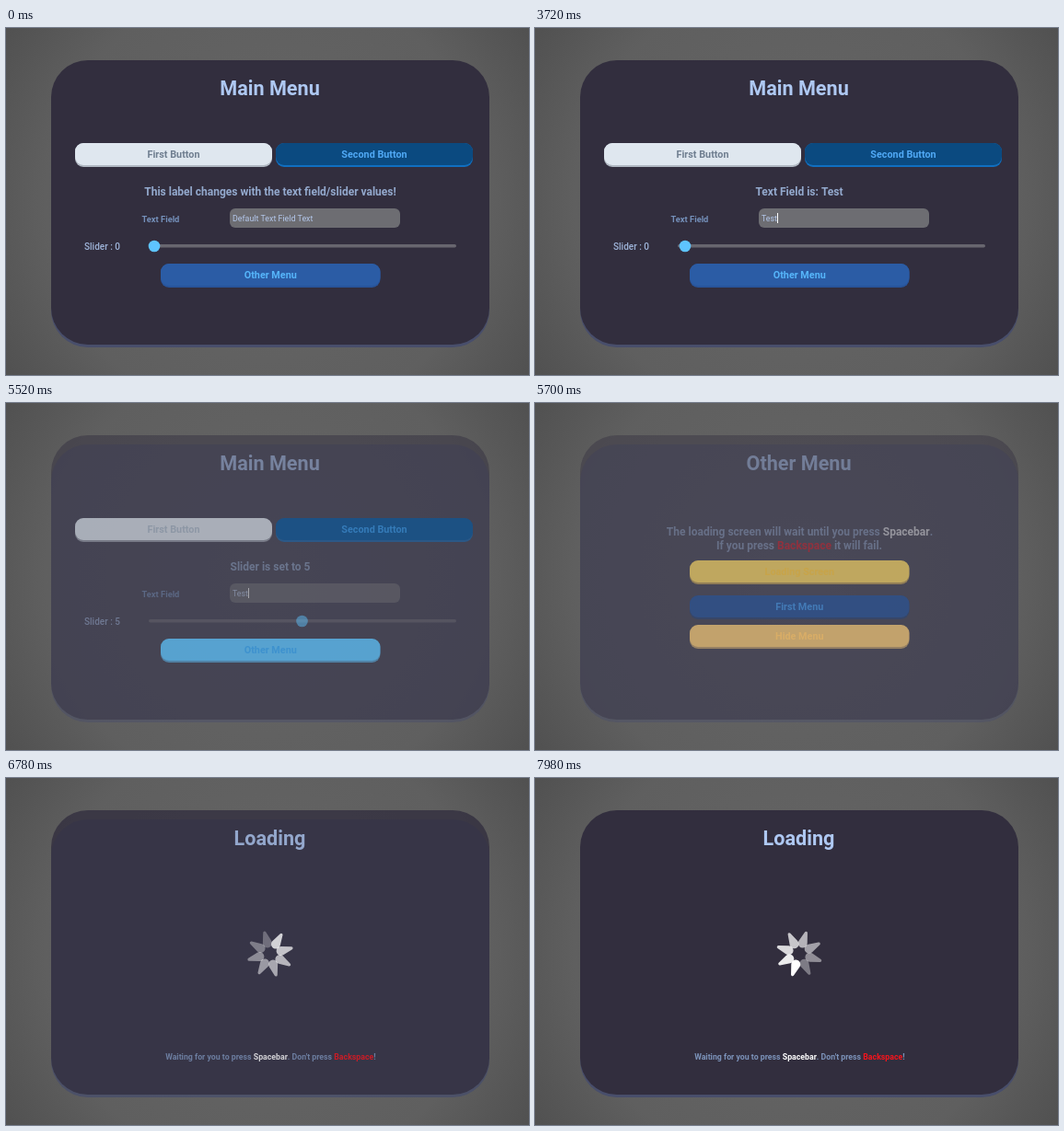
Recreate the animation shown at these times as an HTML page with a canvas. Size 568 px wide and 377 px high, loop 8 s.

```html
<!DOCTYPE html>
<html>
<head>
<meta charset="utf-8">
<style>
html, body { margin: 0; width: 100%; height: 100%; overflow: hidden; background: #5a5a5a; }
canvas { display: block; }
</style>
</head>
<body>
<canvas id="stage" width="568" height="377"></canvas>
<script>
const ctx = document.getElementById('stage').getContext('2d');
const LOOP = 8000, STEP = 60, CX = 287;
const TITLE = '#aec8f2', LABEL = '#93a9cd', NOTE = '#7c93ba';

const backdrop = ctx.createRadialGradient(284, 188, 0, 284, 188, 345);
backdrop.addColorStop(0, '#666');
backdrop.addColorStop(0.7, '#5f5f5f');
backdrop.addColorStop(1, '#505050');

const clamp = v => Math.max(0, Math.min(1, v));
const settle = (t, start, rate) => t < start ? 0 : 1 - Math.exp((start - t) / rate);
// Value of the last [time, value] pair that has been reached.
const latest = (pairs, t) => pairs.reduce((v, [at, next]) => t >= at ? next : v, null);

function box(x, y, w, h, r, color) {
  ctx.fillStyle = color;
  ctx.beginPath();
  ctx.roundRect(x, y, w, h, r);
  ctx.fill();
}

function disc(x, y, r, color) {
  ctx.fillStyle = color;
  ctx.beginPath();
  ctx.arc(x, y, r, 0, 7);
  ctx.fill();
}

function leftText(str, x, cy, size, color, weight = 700) {
  ctx.font = `${weight} ${size}px Roboto, sans-serif`;
  ctx.fillStyle = color;
  ctx.fillText(str, x, cy + size * 0.355);
  return ctx.measureText(str).width;
}

// Centred line made of alternating text and colour arguments.
function line(cx, cy, size, ...runs) {
  ctx.font = `700 ${size}px Roboto, sans-serif`;
  const whole = runs.filter((_, i) => i % 2 === 0).join('');
  let x = cx - ctx.measureText(whole).width / 2;
  for (let i = 0; i < runs.length; i += 2) x += leftText(runs[i], x, cy, size, runs[i + 1]);
}

function button(str, x, y, w, face, edge, ink) {
  box(x, y, w, 26, 9, edge);
  box(x, y, w, 24, 9, face);
  line(x + w / 2, y + 12.6, 10.8, str, ink);
}

function panel(title) {
  box(49, 45, 476, 302, 40, '#484e6b');
  box(49, 35, 476, 309, 40, '#322e3e');
  line(CX - 0.5, 65, 21.6, title, TITLE);
}

function mainMenu(t) {
  const typed = latest([[0, ''], [2040, 'T'], [2160, 'Te'], [2280, 'Tes'], [2460, 'Test']], t);
  const knob = latest([[0, 161], [3720, 163], [3900, 180], [3960, 199], [4080, 222],
    [4260, 236], [4320, 252], [4380, 268], [4500, 284], [4680, 296], [4740, 310], [4800, 321.5]], t);
  const value = Math.round((knob - 161) / 32.2);

  panel('Main Menu');
  button('First Button', 75, 125, 214, '#dfe7ef', '#b0b8c2', '#6f7e90');
  button('Second Button', 293, 125, 214, '#0b4a80', '#106fc0', '#50a9f5');

  const label = t >= 3900 ? 'Slider is set to ' + value
    : typed ? 'Text Field is: ' + typed
    : 'This label changes with the text field/slider values!';
  line(CX, 178, 12, label, LABEL);

  leftText('Text Field', 147.5, 207.5, 9.3, '#7591bb');
  box(243, 196, 185, 21, 6, '#6d6d72');
  if (t >= 1320 && !typed) box(246, 201, 88, 11, 0, 'rgba(168,206,255,.75)');
  const width = leftText(typed || 'Default Text Field Text', 246, 207, 8.85, '#b4c8ec', 400);
  if (typed) box(246 + width, 201, 1, 11, 0, '#fff');

  leftText('Slider : ' + value, 85, 237, 10, '#9fb5da', 500);
  box(155, 235, 334, 3.5, 1.7, '#68666f');
  disc(knob, 237, 6.3, '#5ec4ff');

  const colors = t >= 5100 ? ['#5fc6ff', '#5fc6ff', '#2380cb'] : ['#2b5ca5', '#28549a', '#56b5fa'];
  button('Other Menu', 168, 256, 238.5, ...colors);
}

function otherMenu(t) {
  panel('Other Menu');
  line(CX, 140, 12, 'The loading screen will wait until you press ', LABEL, 'Spacebar', '#fff', '.', LABEL);
  line(CX, 154.5, 12, 'If you press ', LABEL, 'Backspace', '#f5141c', ' it will fail.', LABEL);
  button('Loading Screen', 168, 171, 238.5, '#ffe06a', '#f3c95a', '#d59f2c');
  button('First Menu', 168, 209, 238.5, '#2b5ca5', '#214680', '#5bb8ff');
  const colors = t < 5940 ? ['#ffcf78', '#ffcf78', '#f8bc60'] : ['#f5982b', '#a9631f', '#a9691f'];
  button('Hide Menu', 168, 241, 238.5, ...colors);
}

function spinner(t) {
  const alpha = ctx.globalAlpha;
  const head = (108 + (7980 - t) * 0.16) * Math.PI / 180;
  for (let i = 0; i < 8; i++) {
    ctx.save();
    ctx.translate(CX, 191);
    ctx.rotate(head + i * Math.PI / 4);
    ctx.globalAlpha = alpha * (1 - i * 0.09);
    ctx.fillStyle = '#fff';
    ctx.beginPath();
    ctx.arc(12, 0, 5, 1.29, -1.29);
    ctx.arc(23.8, 0, 1.6, -1.29, 1.29);
    ctx.fill();
    ctx.restore();
  }
}

function loading(t) {
  panel('Loading');
  spinner(t);
  line(CX, 303, 8.75, 'Waiting for you to press ', NOTE, 'Spacebar', '#fff',
    ". Don't press ", NOTE, 'Backspace', '#f5141c', '!', NOTE);
}

function draw(now) {
  const t = Math.floor(now % LOOP / STEP) * STEP;
  ctx.globalAlpha = 1;
  ctx.fillStyle = backdrop;
  ctx.fillRect(0, 0, 568, 377);

  const screens = [
    [mainMenu, 1 - clamp((t - 5385) / 255)],
    [otherMenu, settle(t, 5640, 110) * (1 - clamp((t - 6580) / 110))],
    [loading, settle(t, 6690, 60)]
  ];
  for (const [screen, alpha] of screens) {
    if (alpha <= 0) continue;
    ctx.globalAlpha = alpha > 0.97 ? 1 : alpha;
    screen(t);
  }
  requestAnimationFrame(() => draw(performance.now()));
}
draw(0);
</script>
</body>
</html>
```
